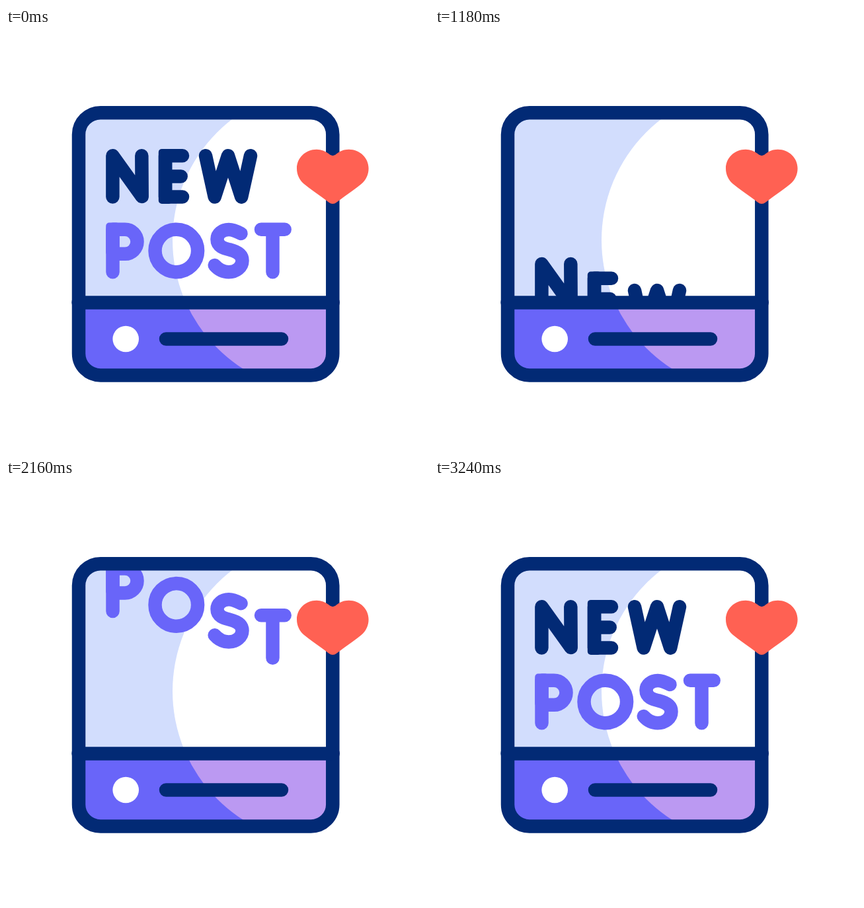
An HTML page that plays this animation: 640 by 640 pixels, repeating every 3260 ms.

```html
<!DOCTYPE html>
<html lang="en">
<head>
<meta charset="utf-8">
<title>New post</title>
<style>
  html, body { margin: 0; width: 100%; height: 100%; overflow: hidden; background: #fff; }
  svg { display: block; width: 100%; height: 100%; }
  .line { fill: none; stroke-width: 20.5; stroke-linecap: round; stroke-linejoin: round; }
  .navy { stroke: #022a75; }
  .new { stroke: #022a75; fill: #022a75; }
  .post { stroke: #6965f9; fill: #6965f9; }
  .solid { stroke: none; }
  .new path, .post path, .post circle { fill: none; }
</style>
</head>
<body>
<svg viewBox="0 0 640 640" role="img" aria-label="New post">
  <defs>
    <clipPath id="cardClip"><rect x="110" y="128" width="384.5" height="397.5" rx="33"/></clipPath>
    <clipPath id="upperClip"><rect x="112" y="130" width="380" height="285"/></clipPath>
    <clipPath id="lowerClip"><rect x="110" y="415" width="385" height="111"/></clipPath>
  </defs>
  <g id="card">
    <g clip-path="url(#cardClip)">
      <rect x="110" y="128" width="385" height="288" fill="#d2ddfd"/>
      <circle cx="483" cy="321" r="231" fill="#fff"/>
      <g clip-path="url(#lowerClip)">
        <rect x="110" y="415" width="385" height="111" fill="#6965f9"/>
        <circle cx="483" cy="321" r="231" fill="#bb99f2"/>
      </g>
    </g>
    <g clip-path="url(#upperClip)">
      <g class="letter line post"><path d="M386 304.8H421.7M403.5 304.8V369.3"/></g>
      <g class="letter line post"><path d="M355.5 311C347 306.5 343 305 337 305C327 305 319.5 311.5 319.5 319.5C319.5 331 331 333.5 338 335.3C349 338 357.5 342 357.5 352C357.5 362 348 369.2 337 369.2C328 369.2 321 365 315.7 359"/></g>
      <g class="letter line post"><circle cx="257.8" cy="337" r="32.3"/></g>
      <g class="letter line post">
        <rect class="solid" x="151.2" y="294.6" width="20.5" height="50" rx="5"/>
        <path d="M161.5 369.3V304.8H180a18.5 18.5 0 0 1 0 37H161.5"/>
      </g>
      <g class="letter line new"><path d="M302 193.2L315.7 255.6L336 193.2L356.2 255.6L370 193.2"/></g>
      <g class="letter line new">
        <rect class="solid" x="230.8" y="182.9" width="20.5" height="83" rx="5"/>
        <path d="M267 193.2H241V255.6H267M241 224.4H264.7"/>
      </g>
      <g class="letter line new"><path d="M161.4 255.6V193.2L205.7 255L205.3 193.2"/></g>
    </g>
    <g class="line navy">
      <rect x="110" y="128.2" width="384.3" height="397.3" rx="33"/>
      <path d="M109.6 415.5H494.7M242 470.5H417"/>
    </g>
    <circle cx="181.2" cy="470.5" r="19.8" fill="#fff"/>
    <path id="heart" fill="#ff6153" d="M488 190C483 186 477 183.7 470 183.7C453 183.7 440 196.5 440 212.5C440 222 444 230 451 236C462 245 476 254 488 263.5Q494.3 268.5 500.6 263.5C512.6 254 526.6 245 537.6 236C544.6 230 548.6 222 548.6 212.5C548.6 196.5 535.6 183.7 518.6 183.7C511.6 183.7 505.6 186 500.6 190Q494.3 196.5 488 190Z"/>
  </g>
</svg>
<script>
  const LOOP = 3260;
  const TILT_PERIOD = 1200;
  const LETTER_DELAY = 36;

  const card = document.getElementById('card');
  const heart = document.getElementById('heart');
  const letters = [...document.querySelectorAll('.letter')];

  // Smooth 0 to 1 progress over a time span.
  function ease(t, start, duration) {
    const x = Math.min(1, Math.max(0, (t - start) / duration));
    return x * x * (3 - 2 * x);
  }

  // Lift, drop out below, come back in from above, overshoot, settle.
  function letterOffset(t) {
    if (t < 1500) return -18 * ease(t, 0, 600) + 244 * ease(t, 630, 500);
    return -236 + 245.5 * ease(t, 1866, 546) - 9.5 * ease(t, 2412, 600);
  }

  function draw(t) {
    const local = t < TILT_PERIOD ? t : t - TILT_PERIOD;
    const rise = ease(local, 0, 600);
    const tilt = -5 * (rise - ease(local, 632, 308));
    const scale = 1 + 0.327 * (rise - ease(local, 600, 310));

    card.setAttribute('transform', `rotate(${tilt} 11 313)`);
    heart.setAttribute('transform',
      `translate(488 266) scale(${scale}) translate(-488 -266)`);
    letters.forEach((letter, i) => {
      letter.setAttribute('transform',
        `translate(0 ${letterOffset(t - i * LETTER_DELAY)})`);
    });
  }

  const begin = performance.now();
  function tick() {
    draw((performance.now() - begin) % LOOP);
    requestAnimationFrame(tick);
  }
  draw(0);
  requestAnimationFrame(tick);
</script>
</body>
</html>
```
